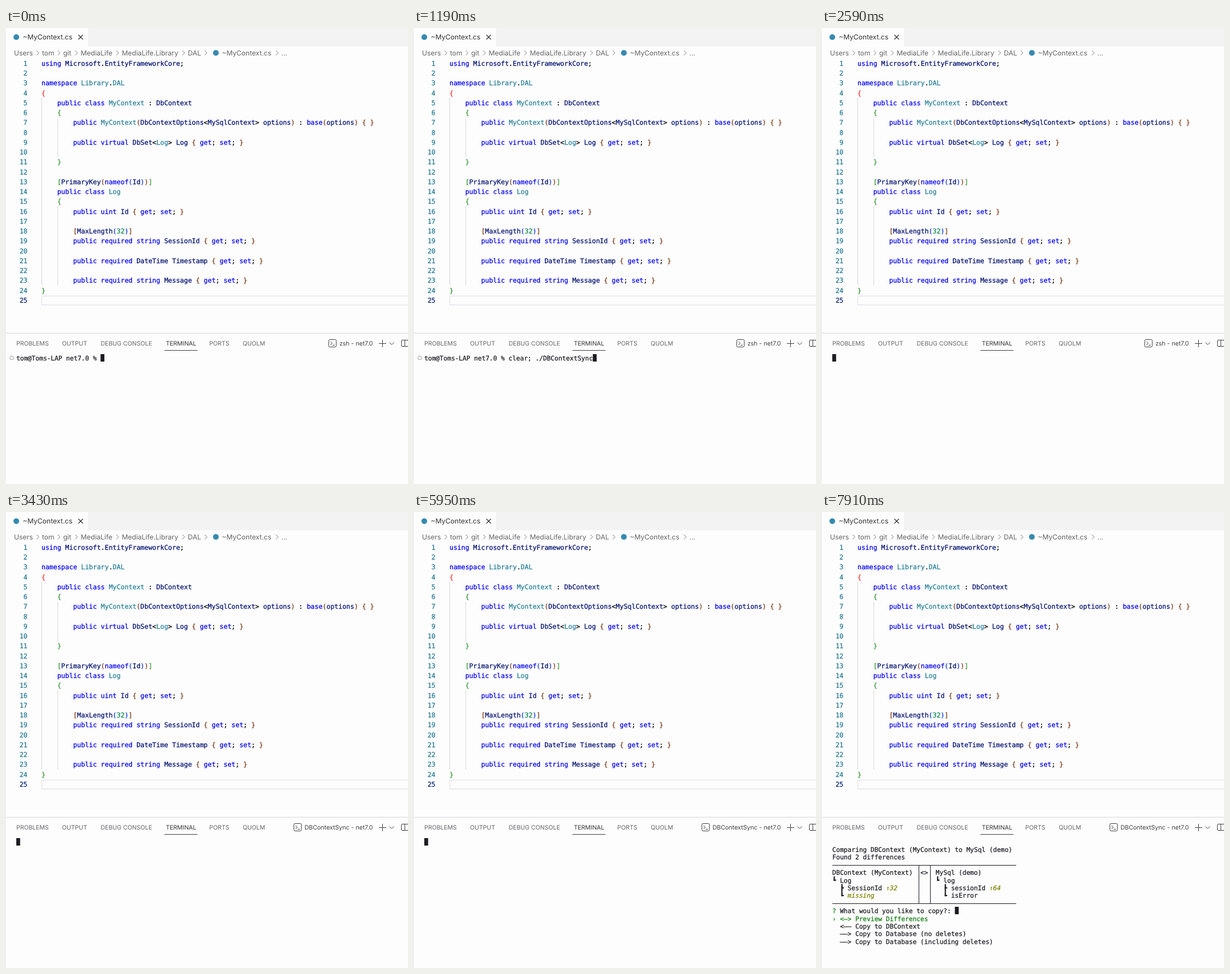
An HTML page with a canvas that plays this animation: 703x797 px, repeating every 8 s.

```html
<!DOCTYPE html>
<html lang="en">
<head>
<meta charset="utf-8">
<title>Editor and terminal</title>
<style>
html, body { margin: 0; width: 100%; height: 100%; overflow: hidden; background: #fdfdfd; }
canvas { display: block; width: 703px; height: 797px; }
</style>
</head>
<body>
<canvas id="stage"></canvas>
<script>
const W = 703, H = 797, LOOP = 8000;
const TYPED = 390, CLEARED = 1870, RENAMED = 2910, LISTED = 6190;

const MONO = '"DejaVu Sans Mono", monospace';
const SANS = 'Inter, sans-serif';
const CODE_FONT = '11.5px ' + MONO;
const TERM_FONT = '11.13px ' + MONO;
const NAME_FONT = '12px ' + SANS;
const CODE_X = 62, CODE_Y = 61.8, CODE_STEP = 17.25;
const TERM_X = 18, TERM_Y = 576.5, TERM_STEP = 13.4;
const INK = '#1c1c22', GREEN = '#107c10', OLIVE = '#7f7f00', ICON = '#368ab0';

const code = `using Microsoft.EntityFrameworkCore;

namespace Library.DAL
{
    public class MyContext : DbContext
    {
        public MyContext(DbContextOptions<MySqlContext> options) : base(options) { }

        public virtual DbSet<Log> Log { get; set; }

    }

    [PrimaryKey(nameof(Id))]
    public class Log
    {
        public uint Id { get; set; }

        [MaxLength(32)]
        public required string SessionId { get; set; }

        public required DateTime Timestamp { get; set; }

        public required string Message { get; set; }
}
`.split('\n');

const keywords = new Set(('using namespace public class base virtual get set ' +
  'nameof uint required string').split(' '));
const types = new Set(['MyContext', 'Library', 'DAL']);
const bracketColors = ['#0431fa', '#319331', '#7b3814'];

const canvas = document.getElementById('stage');
const ctx = canvas.getContext('2d');
const ratio = window.devicePixelRatio || 1;
canvas.width = W * ratio;
canvas.height = H * ratio;
ctx.scale(ratio, ratio);
ctx.textRendering = 'geometricPrecision';

function text(str, x, y, color, font, align = 'left') {
  ctx.font = font;
  ctx.fillStyle = color;
  ctx.textAlign = align;
  ctx.fillText(str, x, y);
}

// Monospace text carries a hairline outline for a slightly heavier weight.
function monoText(str, x, y, color, font, align) {
  text(str, x, y, color, font, align);
  ctx.strokeStyle = color;
  ctx.lineWidth = 0.25;
  ctx.strokeText(str, x, y);
}

function rect(x, y, w, h, color) {
  ctx.fillStyle = color;
  ctx.fillRect(x, y, w, h);
}

function line(points, color, width = 1) {
  ctx.strokeStyle = color;
  ctx.lineWidth = width;
  ctx.beginPath();
  points.forEach(([x, y]) => ctx.lineTo(x, y));
  ctx.stroke();
}

function dot(x, y, r, color) {
  ctx.fillStyle = color;
  ctx.beginPath();
  ctx.arc(x, y, r, 0, Math.PI * 2);
  ctx.fill();
}

function box(x, y, w, h, r, color) {
  ctx.strokeStyle = color;
  ctx.lineWidth = 1;
  ctx.beginPath();
  ctx.roundRect(x, y, w, h, r);
  ctx.stroke();
}

function cellWidth(font) {
  ctx.font = font;
  return ctx.measureText('0').width;
}

function drawTabs() {
  rect(143, 0, W - 143, 32, '#f3f3f3');
  dot(18, 16, 5, ICON);
  text('~MyContext.cs', 29.5, 20, '#333333', NAME_FONT);
  line([[126.5, 12], [134.5, 20]], '#333333', 1.2);
  line([[134.5, 12], [126.5, 20]], '#333333', 1.2);

  const crumbs = [['Users', 14], ['tom', 63], ['git', 100], ['MediaLife', 130.5],
    ['MediaLife.Library', 202.5], ['DAL', 318], ['~MyContext.cs', 377.5], ['...', 481.5]];
  crumbs.forEach(([name, x]) => text(name, x, 47.5, '#66666a', NAME_FONT));
  [53.5, 90.5, 121, 193, 308.5, 347.5, 472].forEach(x =>
    line([[x, 39.5], [x + 4, 43.5], [x, 47.5]], '#77777c'));
  dot(367, 43.5, 5, ICON);
}

function tokenColor(word, before) {
  if (keywords.has(word)) return '#0000ee';
  if (types.has(word) || word === 'Log' && /(class |<)$/.test(before)) return '#267f99';
  if (/^\d/.test(word)) return '#098658';
  return /\w/.test(word) ? '#001070' : '#000000';
}

function drawCode() {
  const top = row => CODE_Y + (row - 1) * CODE_STEP - CODE_STEP / 2;
  const guide = (x, from, to) =>
    rect(x, top(from), 1, top(to + 1) - top(from), '#d5d5e0');
  guide(62, 5, 23);
  guide(90, 7, 10);
  guide(90, 16, 23);
  ctx.strokeStyle = '#e6e6ee';
  ctx.lineWidth = 1.5;
  ctx.strokeRect(62.5, 468.5, W, 15.5);

  const cell = cellWidth(CODE_FONT);
  let depth = 1;
  code.forEach((src, i) => {
    const y = Math.round(CODE_Y + i * CODE_STEP) + 4;
    monoText(i + 1, 37.5, y, i === 24 ? '#0b216f' : '#237893', CODE_FONT, 'right');
    for (const { 0: word, index } of src.matchAll(/\w+|[^\w\s]/g)) {
      let color = tokenColor(word, src.slice(0, index));
      if (i === 3) color = '#ff3030'; // unmatched brace
      else if ('{[('.includes(word)) color = bracketColors[depth++ % 3];
      else if ('}])'.includes(word)) color = bracketColors[--depth % 3];
      monoText(word, CODE_X + index * cell, y, color, CODE_FONT);
    }
  });
}

function drawPanel(label, iconX) {
  rect(0, 533, W, 1, '#d6d6e4');
  const tabs = [['PROBLEMS', 18], ['OUTPUT', 98], ['DEBUG CONSOLE', 165.5],
    ['TERMINAL', 279.5], ['PORTS', 355.5], ['QUOLM', 414]];
  tabs.forEach(([name, x]) =>
    text(name, x, 555, name === 'TERMINAL' ? '#333333' : '#66666a', '10.5px ' + SANS));
  rect(277, 563, 58, 1, '#424242');

  box(iconX + 0.5, 544.5, 13, 13, 2, '#424242');
  line([[iconX + 3.5, 548], [iconX + 6.5, 551], [iconX + 3.5, 554]], '#424242');
  line([[iconX + 7, 554.5], [iconX + 11, 554.5]], '#424242');
  text(label, 641.5, 555, '#424242', '10.6px ' + SANS, 'right');

  line([[652, 551.5], [665, 551.5]], '#424242');
  line([[658.5, 545], [658.5, 558]], '#424242');
  line([[670.5, 549.5], [674.5, 553.5], [678.5, 549.5]], '#424242');
  box(691.5, 545.5, 12, 11, 1.5, '#424242');
  line([[697.5, 545], [697.5, 557]], '#424242');
}

let termCell;
const termX = col => TERM_X + col * termCell;
const termY = row => TERM_Y + row * TERM_STEP;

function put(str, col, row, color = INK, style = '') {
  monoText(str, termX(col), Math.round(termY(row)) + 3.5, color, style + TERM_FONT);
}

function cursor(col, row) {
  rect(termX(col), Math.round(termY(row)) - 7, termCell, 13, INK);
}

function branch(col, row, last) {
  const x = termX(col) + termCell / 2 - 1, y = termY(row);
  rect(x, y - 6.7, 2.2, last ? 7.8 : 13.4, INK);
  rect(x, y - 1.1, termCell / 2 + 1, 2.2, INK);
}

function drawPrompt(typed) {
  ctx.strokeStyle = '#9a9a9e';
  ctx.lineWidth = 1;
  ctx.beginPath();
  ctx.arc(10, 576.5, 3.3, 0, Math.PI * 2);
  ctx.stroke();
  const prompt = 'tom@Toms-LAP net7.0 % ' + (typed ? 'clear; ./DBContextSync' : '');
  put(prompt, 0, 0);
  cursor(prompt.length, 0);
}

function drawDiff() {
  put('Comparing DBContext (MyContext) to MySql (demo)', 0, 1);
  put('Found 2 differences', 0, 2);

  const upper = Math.round(termY(3)), lower = Math.round(termY(8));
  [upper, lower].forEach(y => rect(TERM_X, y, 48 * termCell, 1, INK));
  [22.5, 25.5].forEach(col =>
    rect(Math.round(termX(col)), upper, 1, lower - upper, INK));

  put('DBContext (MyContext)', 0, 4);
  put('<>', 23, 4);
  put('MySql (demo)', 27, 4);
  const sides = [[0, 'Log', 'SessionId', '↾32'], [27, 'log', 'sessionId', '↾64']];
  for (const [col, table, field, size] of sides) {
    branch(col, 5, true);
    put(table, col + 2, 5);
    branch(col + 2, 6, false);
    put(field, col + 4, 6);
    put(size, col + 14, 6, OLIVE, 'italic ');
    branch(col + 2, 7, true);
  }
  put('missing', 4, 7, OLIVE, 'italic ');
  put('isError', 31, 7);

  put('?', 0, 9, GREEN);
  put('What would you like to copy?:', 2, 9);
  cursor(32, 9);
  put('›', 0, 10, GREEN);
  const choices = [['<–>', 'Preview Differences'], ['<––', 'Copy to DBContext'],
    ['––>', 'Copy to Database (no deletes)'],
    ['––>', 'Copy to Database (including deletes)']];
  choices.forEach(([arrow, name], i) => {
    const color = i ? INK : GREEN;
    put(arrow, 2, 10 + i, color);
    put(name, 6, 10 + i, color);
  });
}

function draw(t) {
  rect(0, 0, W, H, '#fdfdfd');
  drawTabs();
  drawCode();
  if (t < RENAMED) drawPanel('zsh - net7.0', 564);
  else drawPanel('DBContextSync - net7.0', 503);

  termCell = cellWidth(TERM_FONT);
  if (t < CLEARED) drawPrompt(t >= TYPED);
  else if (t < LISTED) cursor(0, 0);
  else drawDiff();
}

const start = performance.now();
function tick() {
  draw((performance.now() - start) % LOOP);
  requestAnimationFrame(tick);
}
tick();
</script>
</body>
</html>
```
